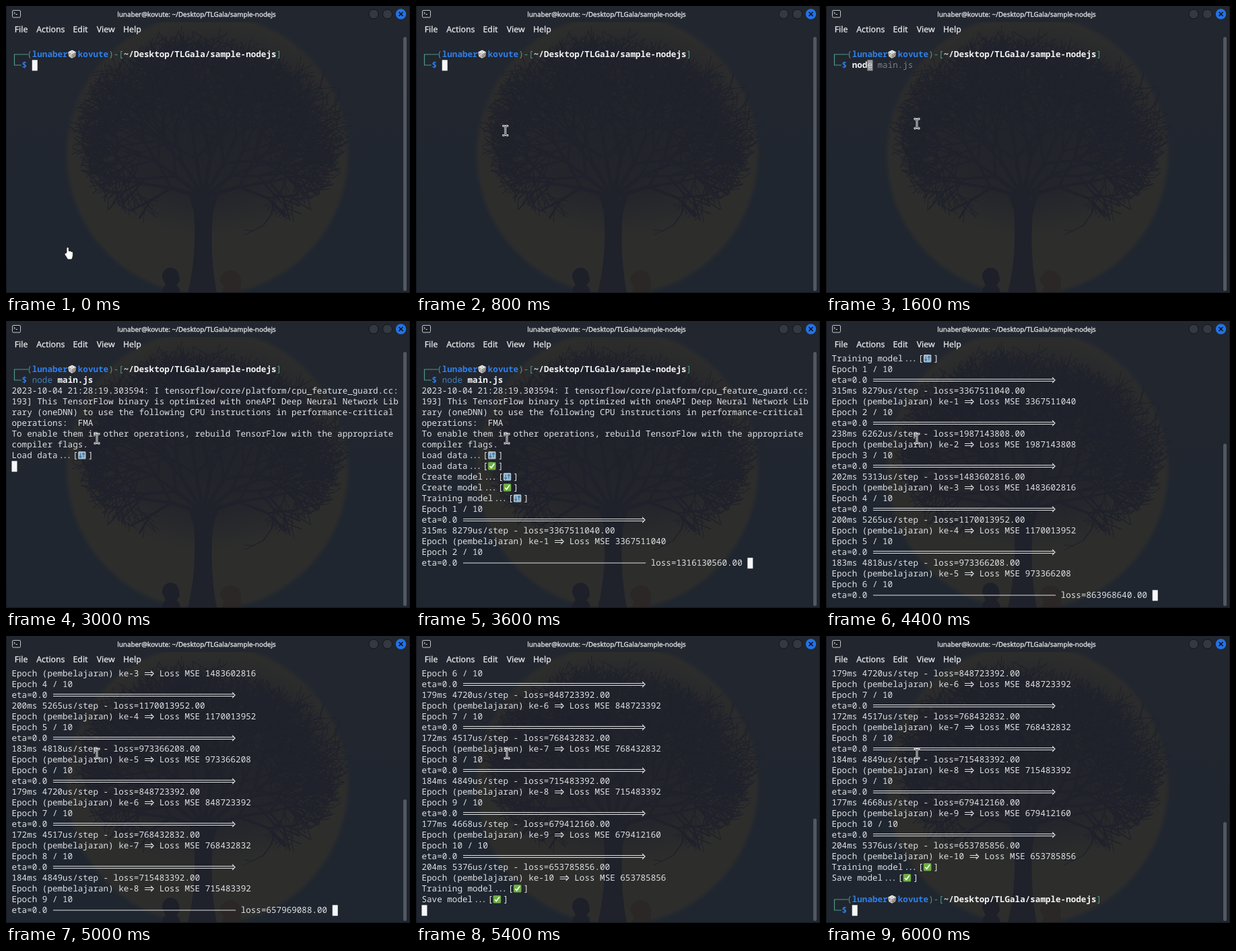
Animation of 600 by 427 pixels, one loop 6100 ms. Source, as an HTML page:

```html
<!DOCTYPE html>
<html lang="en">
<head>
<meta charset="utf-8">
<title>Terminal training run</title>
<style>
  html, body { margin: 0; width: 100%; height: 100%; overflow: hidden; background: #20252e; }
  svg { position: absolute; left: 0; top: 0; width: 600px; height: 427px; }
  text { white-space: pre; text-rendering: geometricPrecision; }
  #rows text { font: 12.6px "Noto Sans Mono", "DejaVu Sans Mono", monospace; fill: #dfe1e4; }
  #rows .user { fill: #2f7fea; font-weight: 700; }
  #rows .path { fill: #f4f5f6; font-weight: 700; }
  #rows .frame { fill: #4f9a88; }
  #rows .cmd { fill: #4480b8; }
  #rows .ghost { fill: #7b7f86; }
  #rows .under { fill: #d4d5d7; }
  #rows .dots { letter-spacing: -2px; }
  .rule { fill: none; stroke: #dfe1e4; stroke-width: 1.1; }
  .ui { font: 12.3px "Noto Sans", "Open Sans", sans-serif; fill: #e9eaec; stroke: #e9eaec; stroke-width: .25; }
  .title { font: 9.9px "Noto Sans", "Open Sans", sans-serif; fill: #dfe1e4; stroke: #dfe1e4; stroke-width: .35; text-anchor: middle; }
</style>
</head>
<body>
<svg viewBox="0 0 600 427">
  <defs>
    <linearGradient id="night" x2="0" y2="1">
      <stop stop-color="#22262f"/><stop offset="1" stop-color="#1f262f"/>
    </linearGradient>
    <radialGradient id="moon">
      <stop offset=".96" stop-color="#2d2d2c"/><stop offset="1" stop-color="#2d2d2c" stop-opacity="0"/>
    </radialGradient>
    <radialGradient id="shade">
      <stop stop-color="#1f212b" stop-opacity=".85"/><stop offset=".65" stop-color="#1f212b" stop-opacity=".6"/>
      <stop offset="1" stop-color="#1f212b" stop-opacity="0"/>
    </radialGradient>
  </defs>
  <rect width="600" height="427" fill="url(#night)"/>
  <circle cx="299" cy="221" r="213" fill="url(#moon)"/>
  <ellipse cx="302" cy="182" rx="208" ry="160" fill="url(#shade)"/>
  <g id="tree" fill="none" stroke="#1f212b" stroke-linecap="round"></g>
  <path d="M270 427Q284 370 279 305L270 275L290 288L297 260L303 290L319 268L307 308Q302 370 313 427Z" fill="#1f212b"/>
  <path d="M232 404a12.500 13 0 0 1 25 -3l1 8l-5 7q6 3 5 11h-26q0-8 5-11z" fill="#1d1f29"/>
  <path d="M318 409a15 15 0 0 1 31 0l-1 9l2 9h-30l4-9z" fill="#2a2726"/>
  <rect width="600" height="24" fill="#22262e"/>
  <path d="M.5 0V427M0 426.500H600M599.500 0V427" stroke="#15181e"/>
</svg>

<svg viewBox="0 0 600 427">
  <defs>
    <clipPath id="view"><rect x="0" y="48" width="588" height="376"/></clipPath>
    <g id="spin">
      <rect x=".3" y="2" width="11.500" height="11.500" rx="1.500" fill="#a3bccb"/>
      <path d="M3.800 4.500V11M2 9L3.800 11.200L5.600 9M8.300 11V4.500M6.500 6.500L8.300 4.300L10.100 6.500" fill="none" stroke="#3f78a8" stroke-width="1.300"/>
    </g>
    <g id="done">
      <rect x=".3" y="2" width="11.500" height="11.500" rx="1.500" fill="#6fae45"/>
      <path d="M2.800 8L5 10.500L9.600 4.300" fill="none" stroke="#fff" stroke-width="1.600"/>
    </g>
    <g id="die">
      <path d="M.5 4.500L6.500 1.500L12.500 4.500L6.500 7.500Z" fill="#ecebe8"/>
      <path d="M.5 4.500L6.500 7.500V14L1.500 11Z" fill="#cfcac5"/>
      <path d="M12.500 4.500L6.500 7.500V14L11.500 11Z" fill="#a8a29c"/>
      <path d="M6 4.500h1M2.500 7.500h1M4.500 10.500h1M8 10.500h1M9.500 8.500h1M11 6.500h.5" stroke="#4d4542" stroke-width="1.200"/>
    </g>
    <path id="bar" d="M-3 -7Q-.500 -7 0 -5.500Q.500 -7 3 -7M0 -5.500V5.500M-3 7Q-.500 7 0 5.500Q.500 7 3 7"/>
  </defs>

  <rect x="9.500" y="6.500" width="12" height="10.500" rx="1.500" fill="#1b1e25" stroke="#c3c6ca"/>
  <path d="M11.500 9L13.500 10.500L11.500 12M14.500 12.500H17" fill="none" stroke="#e4e6e8" stroke-width=".9"/>
  <text class="title" id="title" x="283" y="15.500"></text>
  <g fill="#343841" stroke="#12151a"><circle cx="546" cy="12" r="7"/><circle cx="566.500" cy="12" r="7"/></g>
  <circle cx="586.500" cy="12" r="7.700" fill="#2273e6"/>
  <path d="M583.500 9L589.500 15M589.500 9L583.500 15" stroke="#10141b" stroke-width="1.700"/>
  <g class="ui">
    <text x="12.700" y="38.800">File</text><text x="45.200" y="38.800">Actions</text><text x="99.500" y="38.800">Edit</text>
    <text x="134.700" y="38.800">View</text><text x="174" y="38.800">Help</text>
  </g>

  <rect id="thumb" x="590" width="5" rx="2.500" fill="#53575f"/>
  <g clip-path="url(#view)"><g id="rows"><rect id="caret" width="8" height="16"/></g></g>

  <path id="hand" d="M90 367V360.500a1.600 1.600 0 0 1 3.200 0V364.500q3 -.5 3.200 .8q2.600 -.3 3 1.600V371q-.3 3.500-1.800 6h-6q-2-4-4.400-7q-.6-2.200 1-2z" fill="#fff" stroke="#15171c" stroke-width=".8"/>
  <g id="beam" fill="none" stroke-linecap="square">
    <use href="#bar" stroke="#f4f4f4" stroke-width="2.800"/>
    <use href="#bar" stroke="#15171c" stroke-width=".9"/>
  </g>
</svg>

<script>
const LOOP = 6100, LEFT = 8.5, TOP = 48, CELL = 7.56, LINE = 16, VISIBLE = 23, BASE = 12;
const USER = 'lunaber', HOST = 'kovute', DIR = '~/Desktop/TLGala/sample-nodejs';
const $ = id => document.getElementById(id);
const rows = $('rows');

function el(tag, attrs, parent, text) {
  const node = document.createElementNS('http://www.w3.org/2000/svg', tag);
  for (const key in attrs) node.setAttribute(key, attrs[key]);
  if (text) node.textContent = text;
  return parent.appendChild(node);
}

// Bare tree grown from seeded random branches
let seed = 11;
const rand = () => (seed = (seed * 16807) % 2147483647) / 2147483647;
const twigs = Array(7).fill('');
function grow(x, y, angle, len, depth) {
  const nx = x + Math.cos(angle) * len, ny = y + Math.sin(angle) * len;
  const reach = ((nx - 303) / 207) ** 2 + ((ny - 190) / 162) ** 2;
  if (depth > 6 || (depth > 1 && reach > 0.85 + rand() * 0.2)) return;
  twigs[depth] += `M${x.toFixed(1)} ${y.toFixed(1)}L${nx.toFixed(1)} ${ny.toFixed(1)}`;
  const kids = rand() < 0.7 ? 3 : 2;
  for (let i = 0; i < kids; i++) {
    const turn = (i - (kids - 1) / 2) * 0.66 + (rand() - 0.5) * 0.6;
    grow(nx, ny, angle + turn + Math.cos(angle) * 0.08, len * (0.72 + rand() * 0.2), depth + 1);
  }
}
for (let i = 0; i < 8; i++) grow(293, 285, -2.85 + i * 0.365, 50 + rand() * 14, 0);
twigs.forEach((d, i) => el('path', { d, 'stroke-width': 5 * 0.66 ** i + 0.6 }, $('tree')));

// Symbols that take more than one cell
const arrow = n => (g, x) => {
  const end = x + n * CELL - 1;
  el('path', { class: 'rule', d: `M${x + 1} 6.5H${end - 2}M${x + 1} 9.5H${end - 2}M${end - 4} 4L${end} 8L${end - 4} 12` }, g);
};
const icon = id => (g, x) => el('use', { href: '#' + id, x }, g);
const wide = {
  '↻': [2, icon('spin')],
  '✓': [2, icon('done')],
  '◈': [2, icon('die')],
  '⇒': [2, arrow(2)],
  '═': [36, arrow(36)],
  '─': [36, (g, x) => el('path', { class: 'rule', d: `M${x + 1} 8H${x + 36 * CELL}` }, g)],
  '…': [3, (g, x) => el('text', { class: 'dots', x: x + 2, y: BASE }, g, '...')]
};

const items = [], carets = [];
function put(row, from, to, ...runs) {
  const g = el('g', { transform: `translate(0 ${TOP + row * LINE})` }, rows);
  let col = 0;
  for (const run of runs) {
    const [text, cls] = [].concat(run);
    for (const part of text.split(/([↻✓◈⇒═─…])/)) {
      const x = LEFT + col * CELL;
      if (wide[part]) { wide[part][1](g, x); col += wide[part][0]; }
      else if (part) { el('text', { x, y: BASE, class: cls || '' }, g, part); col += part.length; }
    }
  }
  items.push({ g, from, to });
  return g;
}
const say = (row, from, ...runs) => put(row, from, LOOP, ...runs);
const caret = (at, row, col, fill = '#f6f7f8') => carets.push({ at, row, col, fill });

function prompt(row, at) {
  const g = say(row, at, ['   (', 'frame'], [USER + '◈' + HOST, 'user'], [')-[', 'frame'], [DIR, 'path'], [']', 'frame']);
  el('path', { d: 'M33 8H12.500V24H23', fill: 'none', stroke: '#4f9a88', 'stroke-width': 1.2 }, g);
  say(row + 1, at, ['  $', 'user']);
  caret(at, row + 1, 4);
}

// Typing with a grey suggestion after the caret
function type(from, to, n) {
  const full = 'node main.js';
  put(2, from, to, '    ', [full.slice(0, n), n < 4 ? 'path' : 'cmd'], [full[n], 'under'], [full.slice(n + 1), 'ghost']);
  caret(from, 2, 4 + n, '#97999c');
}

prompt(1, 0);
type(1300, 1500, 1);
type(1500, 1600, 2);
type(1600, 1900, 3);
type(1900, 2000, 4);
say(2, 2000, '    ', ['node', 'cmd'], [' main.js', 'path']);
caret(2000, 2, 16);
caret(2100, 3, 0);

[
  '2023-10-04 21:28:19.303594: I tensorflow/core/platform/cpu_feature_guard.cc:',
  '193] This TensorFlow binary is optimized with oneAPI Deep Neural Network Lib',
  'rary (oneDNN) to use the following CPU instructions in performance-critical',
  'operations:  FMA',
  'To enable them in other operations, rebuild TensorFlow with the appropriate',
  'compiler flags.'
].forEach((text, i) => say(3 + i, 2800, text));
caret(2800, 9, 0);
say(9, 2900, 'Load data…[↻]');
caret(2900, 10, 0);
['Load data…[✓]', 'Create model…[↻]', 'Create model…[✓]', 'Training model…[↻]']
  .forEach((text, i) => say(10 + i, 3100, text));
caret(3100, 14, 0);

// Duration in ms, us per step, first batch loss, epoch loss
const epochs = [
  [315, 8279, 3588423680, 3367511040], [238, 6262, 1316130560, 1987143808],
  [202, 5313, 1594210048, 1483602816], [200, 5265, 1097335808, 1170013952],
  [183, 4818, 1042518144, 973366208], [179, 4720, 863968640, 848723392],
  [172, 4517, 791204352, 768432832], [184, 4849, 702331904, 715483392],
  [177, 4668, 657969088, 679412160], [204, 5376, 641870336, 653785856]
];
let clock = 3200;
epochs.forEach(([ms, us, first, loss], i) => {
  const row = 14 + i * 4, end = clock + ms, batch = `loss=${first}.00`;
  say(row, clock, `Epoch ${i + 1} / 10`);
  put(row + 1, clock, end, 'eta=0.0 ─ ' + batch);
  caret(clock, row + 1, 46 + batch.length);
  say(row + 1, end, 'eta=0.0 ═');
  say(row + 2, end, `${ms}ms ${us}us/step - loss=${loss}.00`);
  say(row + 3, end, `Epoch (pembelajaran) ke-${i + 1} ⇒ Loss MSE ${loss}`);
  clock = end;
});
say(54, clock, 'Training model…[✓]');
caret(clock, 55, 0);
say(55, 5400, 'Save model…[✓]');
caret(5400, 56, 0);
prompt(57, 5500);

$('title').textContent = `${USER}@${HOST}: ${DIR}`;

function draw(t) {
  for (const { g, from, to } of items) g.style.display = from <= t && t < to ? '' : 'none';
  const c = carets.filter(k => k.at <= t).pop();
  $('caret').setAttribute('x', LEFT + c.col * CELL);
  $('caret').setAttribute('y', TOP + c.row * LINE + 0.3);
  $('caret').setAttribute('fill', c.fill);

  const total = Math.max(VISIBLE, c.row + 1), height = 378 * VISIBLE / total;
  rows.setAttribute('transform', `translate(0 ${(VISIBLE - total) * LINE})`);
  $('thumb').setAttribute('y', 424 - height);
  $('thumb').setAttribute('height', height);

  const p = Math.min(1, Math.max(0, (t - 200) / 700)), e = p * p * (3 - 2 * p);
  $('hand').style.display = t < 100 ? '' : 'none';
  $('beam').style.display = t < 100 ? 'none' : '';
  $('beam').setAttribute('transform', `translate(${95 + 40 * e} ${363 - 188 * e})`);
}

// The picture refreshes every 100 ms and skips every fifth tick
let last = -1;
function frame() {
  let tick = Math.floor(performance.now() % LOOP / 100);
  if (tick % 5 === 2) tick--;
  if (tick !== last) draw((last = tick) * 100);
  requestAnimationFrame(frame);
}
frame();
</script>
</body>
</html>
```
